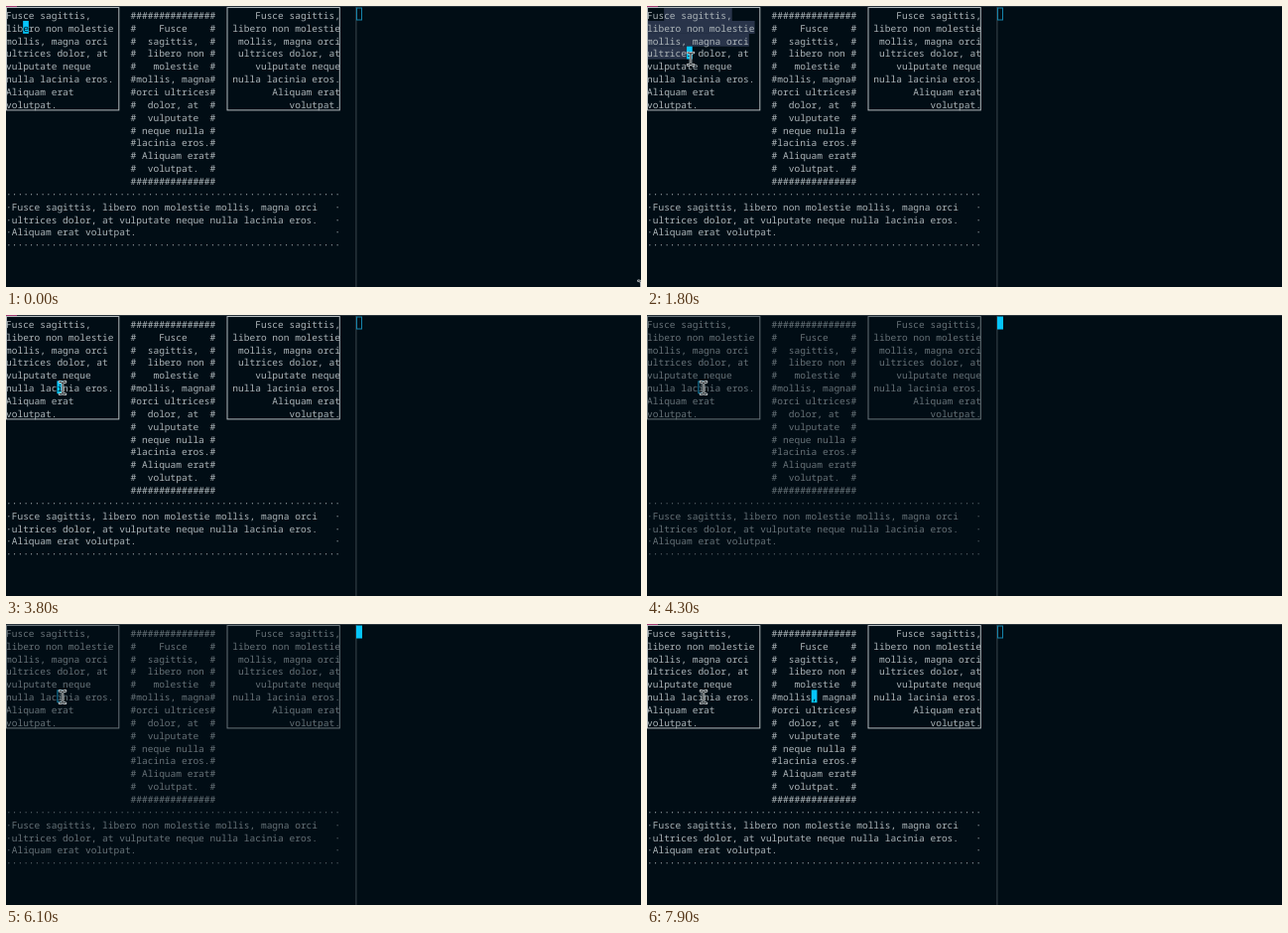
Write an HTML page that moves like this. It is 640 px wide and 283 px high and loops after 8000 ms.

```html
<!DOCTYPE html>
<html lang="en">
<head>
<meta charset="utf-8">
<title>Text alignment in an editor</title>
<style>
  html, body { margin: 0; width: 100%; height: 100%; overflow: hidden; background: #010d15; }
  svg { display: block; width: 100%; height: 100%; }
  text {
    font: 9.524px "Noto Sans Mono", "DejaVu Sans Mono", monospace;
    white-space: pre;
    text-rendering: geometricPrecision;
  }
</style>
</head>
<body>
<svg id="stage" viewBox="0 0 640 283"></svg>
<script>
const NS = 'http://www.w3.org/2000/svg';
const stage = document.getElementById('stage');
const LOOP = 8000, STEP = 100;
const CW = 5.7144, RH = 12.85, TOP = 2.1, BASE = 10.8;
const CYAN = '#06c5fb', RIM = '#1583aa';

function add(tag, attrs, parent = stage) {
  const el = document.createElementNS(NS, tag);
  set(el, attrs);
  parent.appendChild(el);
  return el;
}
function set(el, attrs) {
  for (const key in attrs) el.setAttribute(key, attrs[key]);
}
const colX = col => col * CW;
const rowY = row => TOP + row * RH;

// Page content: left, centred and right paragraphs, then a full-width one
const left = ['Fusce sagittis,', 'libero non molestie', 'mollis, magna orci',
  'ultrices dolor, at', 'vulputate neque', 'nulla lacinia eros.', 'Aliquam erat', 'volutpat.'];
const middle = ['Fusce', 'sagittis,', 'libero non', 'molestie', 'mollis, magna',
  'orci ultrices', 'dolor, at', 'vulputate', 'neque nulla', 'lacinia eros.', 'Aliquam erat', 'volutpat.'];
const wide = ['Fusce sagittis, libero non molestie mollis, magna orci',
  'ultrices dolor, at vulputate neque nulla lacinia eros.', 'Aliquam erat volutpat.'];

const centre = s => '#' + (' '.repeat(Math.ceil((13 - s.length) / 2)) + s).padEnd(13) + '#';
const hashes = '#'.repeat(15), dots = '·'.repeat(59);
const boxed = [hashes, ...middle.map(centre), hashes];
const rows = boxed.map((mid, i) =>
  (left[i] || '').padEnd(22) + mid + (left[i] || '').padStart(22));
rows.push(dots, ...wide.map(s => '·' + s.padEnd(57) + '·'), dots);

add('rect', { width: 640, height: 283, fill: '#010d15' });
add('rect', { width: 640, height: 1, fill: '#263139' });
const mode = add('rect', { width: 11, height: 1, fill: '#a03a70' });
add('rect', { x: 352.4, y: 1, width: 1, height: 282, fill: '#3b464d' });

const shade = add('g', { fill: '#29344a' });
const bars = left.map((s, i) =>
  add('rect', { y: rowY(i), height: RH + 0.1 }, shade));

const page = add('g', {});
rows.forEach((s, i) => {
  add('text', { x: 0, y: rowY(i) + BASE }, page).textContent = s;
});
const frames = add('g', { fill: 'none', 'stroke-width': 1 });
for (const x of [0.5, 223]) {
  add('rect', { x, y: 1.5, width: 113.3, height: 103.4 }, frames);
}

const block = add('rect', { width: CW, height: RH });
const glyph = add('text', { fill: '#01131c' });
const other = add('rect', { x: 353.5, y: 2, width: 5, height: 12 });

const mouse = add('g', { fill: 'none', 'stroke-linecap': 'round' });
const beam = 'M-3-6.2Q-.5-6.2 0-5Q.5-6.2 3-6.2M0-5V5M-3 6.2Q-.5 6.2 0 5Q.5 6.2 3 6.2';
add('path', { d: beam, stroke: '#d5d9db', 'stroke-width': 2.6 }, mouse);
add('path', { d: beam, stroke: '#0a1014', 'stroke-width': 0.9 }, mouse);

// Pointer stops: time, x, y
const path = [[0, 640.5, 283], [800, 34, 59], [900, 34, 59], [1300, 19, 9],
  [1800, 44, 53.2], [2300, 54.5, 75], [2400, 54.5, 75], [2600, 57, 73.6]];

function pointer(t) {
  const i = path.findIndex(p => p[0] > t);
  if (i < 0) return path[path.length - 1].slice(1);
  const [t0, x0, y0] = path[i - 1], [t1, x1, y1] = path[i];
  const u = (t - t0) / (t1 - t0), e = u * u * (3 - 2 * u);
  return [x0 + (x1 - x0) * e, y0 + (y1 - y0) * e];
}

function caret(t, x, y) {
  if (t < 1300) return [3, 1];
  if (t < 7300) return [Math.floor(x / CW), Math.floor((y - TOP) / RH)];
  // one key press, then key repeat
  const held = Math.max(0, t - 7400) / 100;
  return [10 + Math.round(held * 3.8), 5];
}

function draw(t) {
  const [x, y] = pointer(t);
  const [col, row] = caret(t, x, y);
  const away = t >= 4300 && t < 6900;

  set(mouse, { transform: `translate(${x} ${y})` });
  set(page, { fill: away ? '#667177' : '#adb5b9' });
  set(frames, { stroke: away ? '#687379' : '#b3babd' });
  set(mode, { opacity: away ? 0 : 1 });

  const fade = t < 3600 ? 1 : Math.max(0, (3800 - t) / 300);
  set(shade, { opacity: t < 1300 ? 0 : fade });
  bars.forEach((bar, i) => {
    const from = i ? 0 : 3;
    const to = i < row ? left[i].length : i === row ? col : from;
    set(bar, { x: colX(from), width: colX(Math.max(0, to - from)) });
  });

  const inset = away ? 0.5 : 0;
  set(block, {
    x: colX(col) + inset, y: rowY(row) + inset,
    width: CW - 2 * inset, height: RH - 2 * inset,
    fill: away ? 'none' : CYAN, stroke: away ? RIM : 'none'
  });
  set(glyph, { x: colX(col), y: rowY(row) + BASE, opacity: away ? 0 : 1 });
  glyph.textContent = rows[row][col];
  set(other, { fill: away ? CYAN : 'none', stroke: away ? CYAN : RIM });
}

let start;
function tick(now) {
  start ??= now;
  const t = (now - start) % LOOP;
  draw(Math.floor(t / STEP) * STEP);
  requestAnimationFrame(tick);
}
draw(0);
requestAnimationFrame(tick);
</script>
</body>
</html>
```
